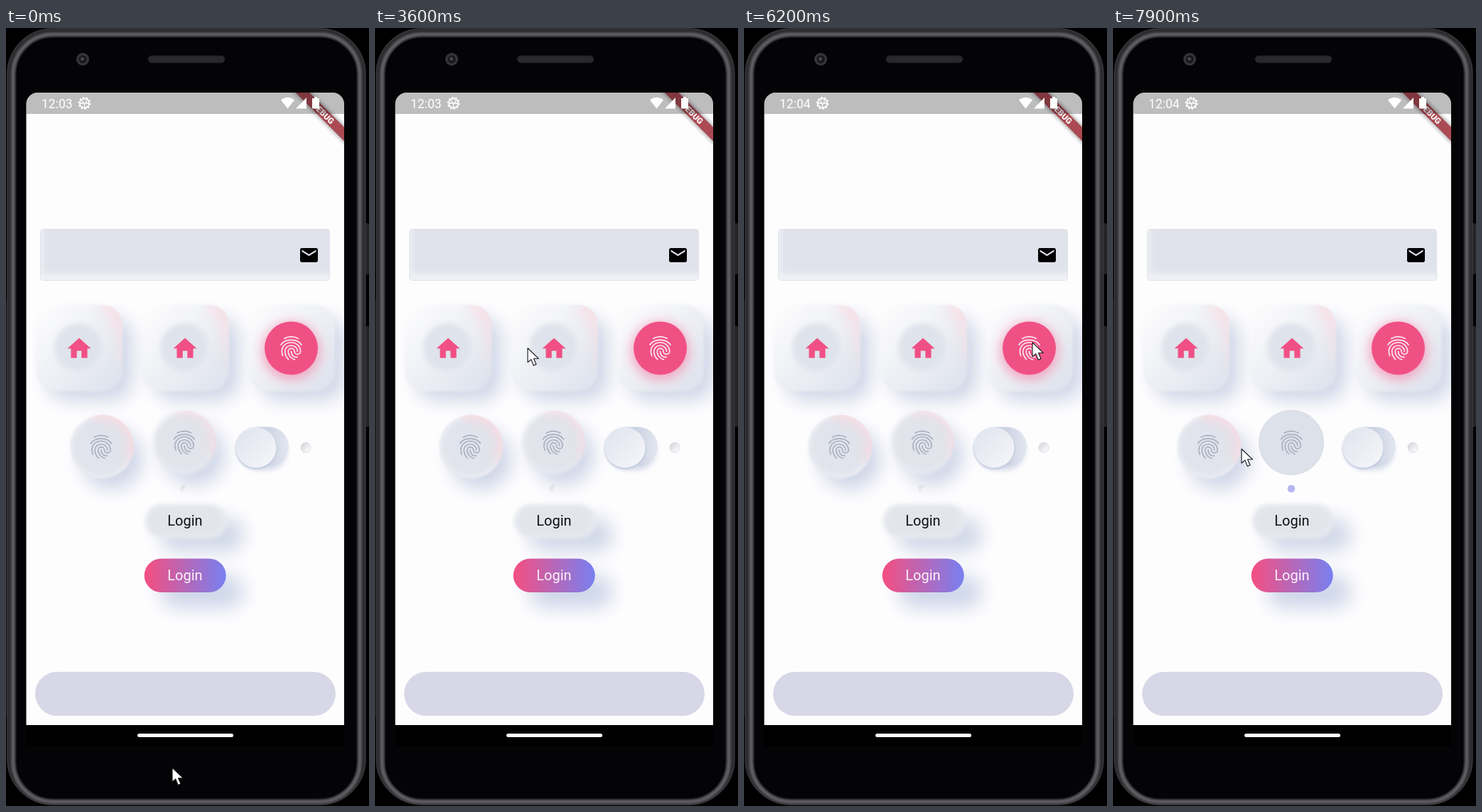
An HTML page that plays this animation: 511x1096 px, repeating every 8 s.

```html
<!DOCTYPE html>
<html lang="en">
<head>
<meta charset="utf-8">
<title>Soft UI demo</title>
<style>
  html, body { margin: 0; width: 100%; height: 100%; overflow: hidden; background: #000; }
  svg { display: block; width: 100%; height: 100%; }
  text { font-family: Roboto, "Open Sans", sans-serif; }
  .print { fill: none; stroke-width: 1; stroke-linecap: round; }
</style>
</head>
<body>
<svg viewBox="0 0 511 1096" xmlns="http://www.w3.org/2000/svg">
  <defs>
    <filter id="b1" x="-30%" y="-30%" width="160%" height="160%"><feGaussianBlur stdDeviation="1.5"/></filter>
    <filter id="b3" x="-40%" y="-40%" width="180%" height="180%"><feGaussianBlur stdDeviation="3.5"/></filter>
    <filter id="b8" x="-60%" y="-60%" width="220%" height="220%"><feGaussianBlur stdDeviation="8"/></filter>
    <filter id="b12" x="-60%" y="-90%" width="220%" height="280%"><feGaussianBlur stdDeviation="13"/></filter>

    <linearGradient id="tile" x2="1" y2="1">
      <stop offset=".05" stop-color="#fcfcfd"/><stop offset=".5" stop-color="#eef0f5"/><stop offset="1" stop-color="#dbe0ec"/>
    </linearGradient>
    <linearGradient id="knob" x2="1" y2="1">
      <stop offset=".1" stop-color="#e1e5ee"/><stop offset=".9" stop-color="#f4f5f9"/>
    </linearGradient>
    <linearGradient id="track" x2="1" y2="0">
      <stop offset=".6" stop-color="#cdd4e4"/><stop offset="1" stop-color="#e3e7ef"/>
    </linearGradient>
    <linearGradient id="dot" x2="1" y2="1">
      <stop offset=".1" stop-color="#d3d5dc"/><stop offset=".8" stop-color="#fafafb"/>
    </linearGradient>
    <linearGradient id="login"><stop offset=".05" stop-color="#ef5186"/><stop offset="1" stop-color="#7780f0"/></linearGradient>

    <clipPath id="screen"><path d="M28.500 982V107a16 16 0 0 1 16-16H460a16 16 0 0 1 16 16V982Z"/></clipPath>
    <clipPath id="tileClip"><rect width="122" height="122" rx="28"/></clipPath>
    <clipPath id="discClip"><circle r="45"/></clipPath>
    <clipPath id="fieldClip"><rect x="48.500" y="283.500" width="407" height="72" rx="4"/></clipPath>

    <path id="home" d="M10 20v-6h4v6h5v-8h3L12 3 2 12h3v8z" transform="scale(1.65) translate(-12 -11.7)" fill="#f05085"/>
    <path id="print" class="print" transform="scale(1.7) translate(-12 -12)" d="M6.200 4C8 3 10 2.500 12 2.500S15.900 3 17.800 4
      M3.500 9.200C5.300 6.700 8.300 5.200 12 5.200S18.600 6.700 20.500 9.200
      M14.900 21.500C13.500 21.100 12.500 20.500 11.500 19.500C10.300 18.300 9.500 16.600 9.500 14.700C9.500 13.300 10.700 12.200 12.100 12.200S14.700 13.300 14.700 14.700C14.700 16 15.800 17.100 17.200 17.100S19.700 16 19.700 14.700C19.700 10.600 16.300 7.300 12 7.300C9 7.300 6.200 9 4.900 11.700C4.100 13.400 4.200 16 5 18.300
      M9.700 21.300C7.900 19.500 6.800 17.600 6.800 14.700C6.800 12 9.100 9.800 12 9.800S17.200 12 17.200 14.700
      M17 19.400C13.800 19.800 11.950 17.400 11.950 14.700"/>

    <g id="tileBox">
      <rect x="16" y="17" width="120" height="118" rx="30" fill="#c6cfe3" opacity=".85" filter="url(#b12)"/>
      <rect width="122" height="122" rx="28" fill="url(#tile)" filter="url(#b1)"/>
    </g>
    <g id="tileSheen" clip-path="url(#tileClip)">
      <path d="M92 -4H126V84H119Q116 24 92 8Z" fill="#fad9df" opacity=".6" filter="url(#b8)"/>
    </g>
    <g id="well">
      <circle r="35" fill="#e7eaf1" filter="url(#b3)"/>
      <circle cx="-1" cy="-1" r="32" fill="#dfe3eb" filter="url(#b3)"/>
    </g>
    <circle id="discShadow" cx="14" cy="17" r="43" fill="#c5cee3" opacity=".85" filter="url(#b12)"/>
    <g id="discSheen" clip-path="url(#discClip)">
      <path d="M-12 -46A46 46 0 0 1 42 20" fill="none" stroke="#fbd3da" stroke-width="18" opacity=".8" filter="url(#b8)"/>
    </g>
  </defs>

  <!-- phone body -->
  <rect width="511" height="1096"/>
  <g fill="#242426">
    <rect x="504" y="275" width="7" height="72" rx="2"/>
    <rect x="504" y="420" width="7" height="142" rx="2"/>
    <rect y="382" width="4" height="590" rx="2" fill="#151517"/>
  </g>
  <rect x="2" y="1" width="504" height="1093" rx="64" fill="#2b2b2e" stroke="#39393c" stroke-width="1.500"/>
  <rect x="10" y="9" width="488" height="1081" rx="56" fill="#040406" stroke="#626267" stroke-width="5" filter="url(#b1)"/>
  <rect x="15" y="14" width="478" height="1071" rx="51" fill="#040406"/>
  <circle cx="108" cy="44" r="9" fill="#353537"/>
  <circle cx="108" cy="44" r="5.500" fill="#18181b"/>
  <circle cx="107.500" cy="43.500" r="2.500" fill="#47474c"/>
  <rect x="200" y="39" width="108" height="10" rx="5" fill="#29292b" stroke="#1b1b1d"/>
  <rect x="29" y="982" width="447" height="30"/>
  <rect x="185" y="994" width="135" height="5" rx="2.500" fill="#fff"/>

  <g clip-path="url(#screen)">
    <rect x="28" y="91" width="448" height="891" fill="#fefdfe"/>

    <!-- text field -->
    <rect x="48.500" y="283.500" width="407" height="72" rx="4" fill="#eff1f5"/>
    <g clip-path="url(#fieldClip)">
      <rect x="52" y="276" width="412" height="70" rx="4" fill="#e0e3ec" filter="url(#b3)"/>
    </g>
    <rect x="48.500" y="283.500" width="407" height="72" rx="4" fill="none" stroke="#dfe1e7"/>
    <path transform="translate(411.500 305) scale(1.25)" d="M20 4H4c-1.100 0-2 .9-2 2v12c0 1.100.9 2 2 2h16c1.100 0 2-.9 2-2V6c0-1.100-.9-2-2-2zm0 4l-8 5-8-5V6l8 5 8-5v2z"/>

    <!-- tiles -->
    <g transform="translate(42 390)"><use href="#tileBox"/><use class="sheen" href="#tileSheen"/></g>
    <g transform="translate(192 390)"><use href="#tileBox"/><use class="sheen" href="#tileSheen"/></g>
    <use href="#tileBox" x="341" y="390"/>
    <use href="#well" x="103" y="451"/>
    <circle id="homePress" cx="103" cy="451" r="36" fill="#dce0ea"/>
    <use href="#home" x="103" y="451"/>
    <use href="#well" x="252" y="451"/>
    <use href="#home" x="252" y="451"/>
    <g transform="translate(401.500 451)">
      <circle id="glow" cy="4" r="41" fill="#f58fb0" filter="url(#b8)"/>
      <circle r="37.500" fill="#f05185"/>
      <g id="pinkPress">
        <circle r="37.500" fill="#f28fb0"/>
        <circle r="36" fill="#ea719a" filter="url(#b1)"/>
      </g>
      <use href="#print" stroke="#fdeaf0"/>
    </g>

    <!-- round buttons -->
    <g transform="translate(135 590)">
      <use href="#discShadow"/>
      <circle r="44.500" fill="#eceef3" filter="url(#b1)"/>
      <circle r="41" fill="#e1e4ec" filter="url(#b3)"/>
      <use class="sheen" href="#discSheen"/>
      <use href="#print" x="-1" stroke="#aab0c0"/>
    </g>
    <g transform="translate(251 584)">
      <g id="raised">
        <use href="#discShadow"/>
        <circle r="44" fill="#eaecf2" filter="url(#b3)"/>
        <circle r="40" fill="#e1e4eb" filter="url(#b3)"/>
        <g opacity=".7"><use class="sheen" href="#discSheen"/></g>
      </g>
      <circle id="flat" r="45.500" fill="#dde1ea" stroke="#d5d9e3"/>
      <use href="#print" stroke="#aab0c0"/>
    </g>

    <!-- switch and lamps -->
    <rect x="328" y="568" width="68" height="55" rx="27" fill="#cbd3e5" opacity=".8" filter="url(#b3)"/>
    <rect x="330" y="562" width="68" height="55" rx="27.500" fill="url(#track)"/>
    <circle cx="352" cy="592.500" r="29" fill="#bfc8db" filter="url(#b1)"/>
    <circle cx="352" cy="591" r="28.500" fill="url(#knob)"/>
    <circle cx="422" cy="591" r="7" fill="url(#dot)" stroke="#d9dbe1"/>
    <circle cx="251" cy="649" r="5.300" fill="url(#dot)" opacity=".75"/>
    <circle id="lamp" cx="251" cy="649" r="5.300" fill="#b5b7f1"/>

    <!-- login buttons -->
    <g font-size="20" text-anchor="middle">
      <rect x="217" y="690" width="118" height="48" rx="24" fill="#c8d0e4" opacity=".85" filter="url(#b12)"/>
      <rect x="196" y="671" width="114" height="47" rx="23" fill="#eaecf1" filter="url(#b3)"/>
      <rect x="199" y="674" width="108" height="41" rx="20" fill="#e2e5eb" filter="url(#b3)"/>
      <text x="252" y="701" fill="#101012">Login</text>
      <rect x="217" y="770" width="118" height="48" rx="24" fill="#c8d0e6" opacity=".85" filter="url(#b12)"/>
      <rect x="194.700" y="747.500" width="115" height="47.500" rx="23.700" fill="url(#login)"/>
      <text x="252" y="778" fill="#fdf1f7">Login</text>
    </g>

    <rect x="41" y="907" width="423" height="62" rx="31" fill="#d7d7e7"/>

    <!-- corner banner -->
    <g transform="translate(476 91) rotate(45)">
      <rect x="-60" y="34.500" width="120" height="13.700" opacity=".5" filter="url(#b3)"/>
      <rect x="-60" y="34.500" width="120" height="13.700" fill="#ab4a53"/>
      <text y="45.400" font-size="11.600" font-weight="900" text-anchor="middle" fill="#fff">DEBUG</text>
    </g>

    <!-- status bar -->
    <rect x="28" y="91" width="448" height="30" opacity=".255"/>
    <g fill="#fff">
      <text id="clock" x="50" y="112.500" font-size="17.500">12:03</text>
      <path d="M387 101.500Q396.500 94 406 101.500L396.500 113.500Z"/>
      <path d="M423 98V113.500H408Z"/>
      <path d="M431 99h3v-2h4v2h3v14.500h-10Z"/>
    </g>
    <g fill="none" stroke="#fff">
      <circle cx="110.500" cy="106" r="6.600" stroke-width="1.600"/>
      <circle cx="110.500" cy="106" r="8" stroke-width="1.800" stroke-dasharray="2.500 2.500"/>
      <path d="M104 106h13M108 102v4M113 102v4M110.500 106v6" stroke-width="1.300"/>
    </g>
  </g>

  <path id="cursor" d="M0 0V20L4.800 15.900L8.200 24.400L12 22.800L8.500 14.700H15.300Z" fill="#fff" stroke="#16161a" stroke-width="1.100" stroke-linejoin="round"/>
</svg>
<script>
const LOOP = 8000, STEP = 100;

// rows: time, values...
const path = [
  [0, 234, 1042], [500, 351, 577], [2800, 351, 577], [2900, 297, 329], [3000, 297, 329],
  [3600, 215, 451], [3800, 215, 451], [3900, 283, 420], [4000, 255, 451], [4200, 255, 451],
  [4300, 236, 443], [4500, 236, 443], [4600, 168, 458], [4900, 124, 465], [5400, 124, 465],
  [5500, 189, 457], [5800, 189, 457], [6000, 406, 443], [7000, 406, 443], [7100, 280, 560],
  [7300, 280, 560], [7400, 255, 590], [7800, 255, 590], [7900, 181, 593]
];
const homePress = [[4800, 0], [5000, 1], [5200, 1], [5400, 0]];
const pinkPress = [[6200, 0], [6500, 1], [6700, 1], [7000, 0]];
const toggle = [[7300, 0], [7700, 1]];

const $ = id => document.getElementById(id);
const sheens = document.querySelectorAll('.sheen');

function at(rows, t) {
  const i = rows.findIndex(r => r[0] > t);
  if (i === 0) return rows[0].slice(1);
  if (i < 0) return rows[rows.length - 1].slice(1);
  const a = rows[i - 1], b = rows[i], k = (t - a[0]) / (b[0] - a[0]);
  return a.slice(1).map((v, j) => v + (b[j + 1] - v) * k);
}

function fade(id, v) { $(id).style.opacity = v; }

function draw(t) {
  const [x, y] = at(path, t);
  const [home] = at(homePress, t), [pink] = at(pinkPress, t), [on] = at(toggle, t);
  $('cursor').setAttribute('transform', `translate(${x} ${y})`);
  $('clock').textContent = t < 4600 ? '12:03' : '12:04';
  fade('homePress', home);
  fade('pinkPress', pink);
  fade('glow', 0.75 * (1 - pink));
  fade('raised', 1 - on);
  fade('flat', on);
  fade('lamp', on);
  sheens.forEach(s => { s.style.opacity = 1 - pink; });
}

const start = performance.now();
function tick() {
  const t = (performance.now() - start) % LOOP;
  draw(Math.floor(t / STEP) * STEP);
  requestAnimationFrame(tick);
}
tick();
</script>
</body>
</html>
```
